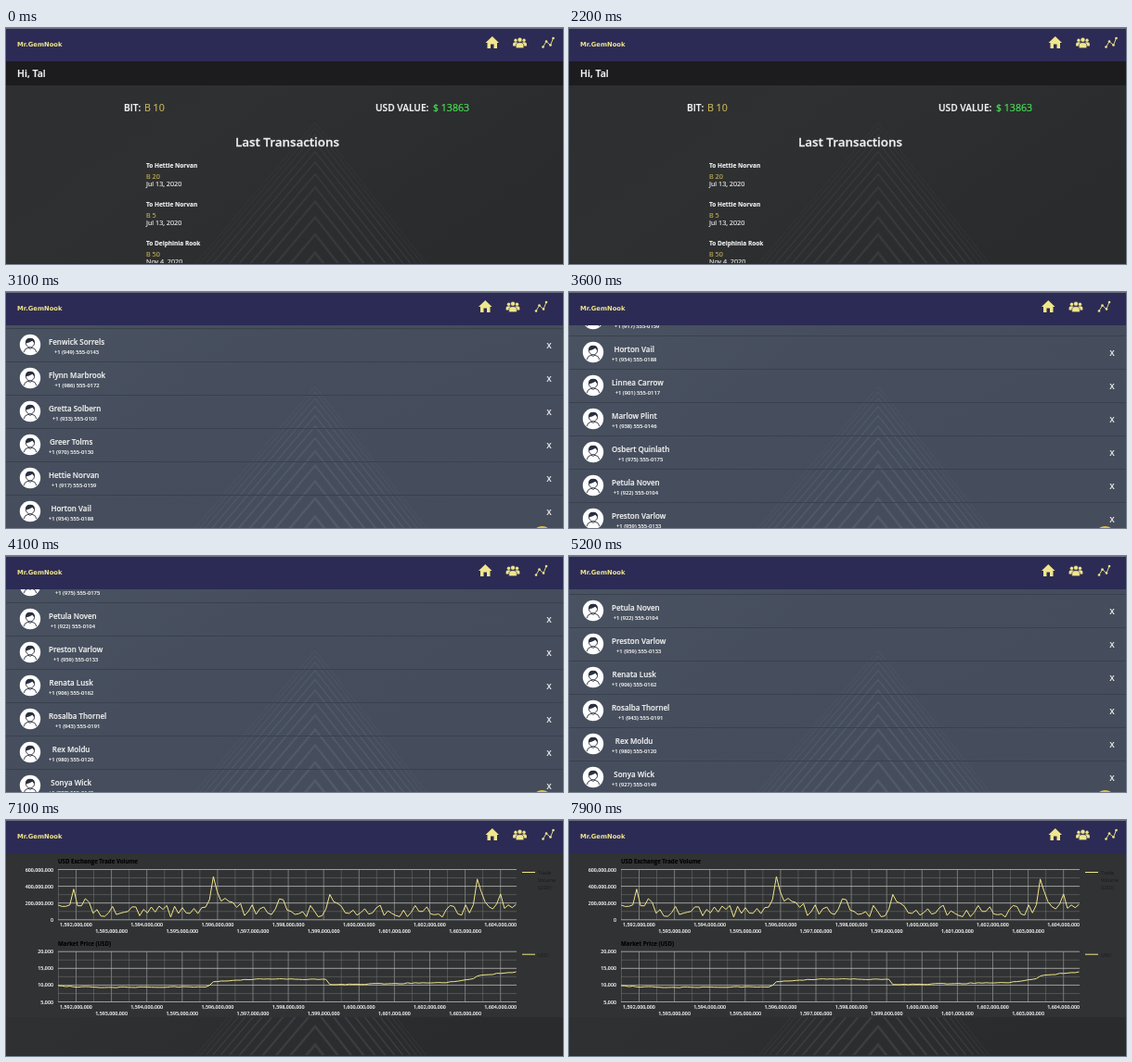
These frames come from a looping animation (600 px wide and 255 px high, 8 s). An HTML page:

```html
<!DOCTYPE html>
<html lang="en">
<head>
<meta charset="utf-8">
<title>Wallet</title>
<style>
  html, body { margin: 0; width: 100%; height: 100%; overflow: hidden; background: #2b2c2e; }
  svg { display: block; width: 600px; height: 255px; font-family: "Open Sans", "Noto Sans", sans-serif; }
  .mid { text-anchor: middle; }
  .end { text-anchor: end; }
</style>
</head>
<body>
<svg id="stage" viewBox="0 0 600 255"></svg>
<script>
const KHAKI = '#f0e68c', WHITE = '#f0f0f0', GOLD = '#c5b358';
const stage = document.getElementById('stage');

// A hairline outline gives the letters a medium weight
const text = (x, y, str, size, fill = WHITE, weight = 500, cls = '') =>
  `<text x="${x}" y="${y}" font-size="${size}" fill="${fill}" font-weight="${weight}" class="${cls}"
    stroke="${fill}" stroke-width="${size * 0.02}">${str}</text>`;
const rect = (x, y, w, h, fill) =>
  `<rect x="${x}" y="${y}" width="${w}" height="${h}" fill="${fill}"/>`;
const line = (x1, y1, x2, y2, stroke, width) =>
  `<path d="M${x1} ${y1}L${x2} ${y2}" stroke="${stroke}" stroke-width="${width}"/>`;
const polyline = points =>
  `<polyline points="${points.join(' ')}" fill="none" stroke="${KHAKI}" stroke-linejoin="round"/>`;
const footer = rect(0, 254, 600, 1, '#33243c');

// Nested chevrons that grow thicker and further apart downwards
function backdrop(fill, stroke) {
  let out = rect(0, 0, 600, 255, fill);
  for (let i = 0; i < 12; i++) {
    const y = 102 + 5.1 * i + 0.7 * i * i, h = 256 - y;
    out += `<path d="M${333 - h * 0.845} 256L333 ${y}L${333 + h * 0.785} 256" fill="none"
      stroke="${stroke}" stroke-width="${0.6 + i * 0.2}"/>`;
  }
  return out;
}

function dashboard() {
  const deals = [['Hettie Norvan', 20, 'Jul 13, 2020'], ['Hettie Norvan', 5, 'Jul 13, 2020'],
    ['Delphinia Rook', 50, 'Nov 4, 2020']];
  return backdrop('url(#dark)', '#37393d') +
    rect(0, 36, 600, 26, '#1c1c1f') +
    text(12, 52.5, 'Hi, Tal', 10.6, WHITE, 600) +
    text(127, 89.5, 'BIT:', 10.2, WHITE, 600) + text(149, 89.5, 'B 10', 10.6, GOLD) +
    text(398, 89.5, 'USD VALUE:', 10.2, WHITE, 600) + text(460, 89.5, '$ 13863', 10.6, '#45e052') +
    text(303, 127.5, 'Last Transactions', 13.4, WHITE, 600, 'mid') +
    deals.map(([who, sum, date], i) => {
      const y = 150.5 + 42 * i;
      return text(151, y, 'To ' + who, 6.5, WHITE, 700) +
        text(151, y + 12.5, 'B ' + sum, 7.2, GOLD) + text(151, y + 20.5, date, 7.2);
    }).join('') + footer;
}

const people = ['Delphinia Rook', 'Fenwick Sorrels', 'Flynn Marbrook', 'Gretta Solbern', 'Greer Tolms',
  'Hettie Norvan', 'Horton Vail', 'Linnea Carrow', 'Marlow Plint', 'Osbert Quinlath', 'Petula Noven',
  'Preston Varlow', 'Renata Lusk', 'Rosalba Thornel', 'Rex Moldu', 'Sonya Wick', 'Tilda Brace'];
const phone = i => `+1 (${900 + (i * 37 + 12) % 90}) 555-01${String((i * 29 + 14) % 100).padStart(2, '0')}`;

function contacts() {
  const rows = people.map((name, i) => `<g transform="translate(0 ${58 + 36 * i})">
    ${line(0, -17.5, 600, -17.5, '#39404e', 1)}
    <use href="#face" x="26"/>
    <g class="label">${text(46, -0.5, name, 8, WHITE, 600, 'mid')}${text(46, 9.5, phone(i), 5.8, WHITE, 600, 'mid')}</g>
    ${text(585, 3.5, 'X', 8, WHITE, 600, 'mid')}</g>`);
  return backdrop('url(#slate)', '#505a69') +
    `<g id="list">${rows.join('')}</g><circle cx="577.5" cy="264" r="11" fill="#dfc33f"/>`;
}

function errors() {
  return backdrop('url(#dark)', '#3b3d42') + [37, 47].map(y =>
    rect(0, y, 65, 8, '#c00') + text(0, y + 6, 'Table has no columns.', 5.7) +
    text(59, y + 6, '×', 6, '#400')).join('') + footer;
}

function chart(top, title, labels, curve, legend) {
  const step = 18.1, bottom = top + 3 * step;
  let out = text(56, top - 6.5, title, 6.1, '#000', 700) + line(56.5, top, 56.5, bottom, '#777', 0.5);
  for (let i = 0; i < 13; i++) {
    const x = 75.5 + 38.1 * i;
    out += line(x, top, x, bottom, '#aaa', 0.6) +
      text(x, bottom + 7.5 + i % 2 * 6.7, `1,${592 + i},000,000`, 5.35, WHITE, 600, 'mid');
    if (i < 12) out += line(x + 19, top, x + 19, bottom, '#777', 0.5);
  }
  labels.forEach((label, i) => {
    const y = top + step * i;
    out += line(56, y, 550, y, '#bbb', 0.8) + text(51, y + 2, label, 5.35, WHITE, 600, 'end');
    if (i < 3) out += line(56, y + step / 2, 550, y + step / 2, '#777', 0.5);
  });
  out += polyline(curve) + line(556, top + 3, 570, top + 3, KHAKI, 1);
  return out + legend.map((s, i) => text(573, top + 5.5 + 8 * i, s, 5.4, '#212122')).join('');
}

function randoms(seed) {
  return () => (seed = seed * 16807 % 2147483647) / 2147483647;
}
const curve = fn => Array.from({ length: 119 }, (_, i) => 56.2 + 4.18 * i).map(x => [x, fn(x)]);

// Trade volume: a restless base with sudden peaks that die away slowly
const peaks = [[73, 18], [86, 9], [224, 38], [244, 9], [295, 10], [349, 20], [508, 34], [531, 16]];
const volumeNoise = randoms(77);
const volume = curve(x => {
  const lift = peaks.reduce((sum, [px, h]) => sum + h * Math.exp(x < px ? (x - px) / 3 : (px - x) / 7), 0);
  return Math.min(105.5, 92 + 13 * volumeNoise() - lift);
});

// Price: straight stretches between a few turning points, slightly rough
const turns = [[56, 179.5], [105, 181], [218, 180], [224, 174.5], [262, 172], [345, 172], [349, 178],
  [475, 175.5], [503, 172], [508, 168], [551, 164]];
const priceNoise = randoms(9);
const price = curve(x => {
  const next = turns.findIndex(([tx]) => tx > x);
  const [x0, y0] = turns[next - 1], [x1, y1] = turns[next];
  return y0 + (y1 - y0) * (x - x0) / (x1 - x0) + priceNoise() - 0.5;
});

function charts() {
  return backdrop('url(#dark)', '#3b3d42') + rect(0, 36, 600, 177, '#313233') +
    chart(53.5, 'USD Exchange Trade Volume', ['600,000,000', '400,000,000', '200,000,000', '0'],
      volume, ['Trade', 'Volume', '(USD)']) +
    chart(142.2, 'Market Price (USD)', ['20,000', '15,000', '10,000', '5,000'], price, ['USD']) + footer;
}

const dots = [[578.5, 20.5], [582, 14.5], [586.5, 18.5], [589.5, 11]];
const person = (x, y, r) => `<circle cx="${x}" cy="${y}" r="${r}"/>
  <path d="M${x - r * 1.7} ${y + r * 3.6}v${-r}q0 ${-r * 1.4} ${r * 1.7} ${-r * 1.4}t${r * 1.7} ${r * 1.4}v${r}z"/>`;
const header = rect(0, 0, 600, 36, '#2c2b55') + rect(0, 0, 600, 1, '#6c6c80') +
  `<text x="12" y="20" font-size="6.8" font-weight="700" fill="${KHAKI}"
    font-family="DejaVu Sans, sans-serif">Mr.GemNook</text>
  <g id="icons" fill="${KHAKI}">
    <path d="M523.8 9L531 16H529V22H525.5V17.5H522V22H518.5V16H516.5Z"/>
    ${person(549, 13.3, 1.7)}${person(558, 13.3, 1.7)}
    <g stroke="#2c2b55" stroke-width=".6">${person(553.5, 12.7, 2.5)}</g>
    <polyline points="${dots.join(' ')}" fill="none" stroke="${KHAKI}" stroke-width=".9"/>
    ${dots.map(([x, y]) => `<circle cx="${x}" cy="${y}" r="1.3"/>`).join('')}
  </g>`;

const gradient = (id, a, b, c) => `<linearGradient id="${id}" x2="1" y2=".6"><stop stop-color="${a}"/>
  <stop offset=".45" stop-color="${b}"/><stop offset="1" stop-color="${c}"/></linearGradient>`;
const defs = `<defs>${gradient('dark', '#2d2e30', '#2f3031', '#2a2b2d')}
  ${gradient('slate', '#4a5361', '#464e5d', '#454c5b')}
  <g id="face"><circle r="11.2" fill="#fff"/>
    <g fill="none" stroke="#2b3040" stroke-width=".9">
      <circle cy="-1.8" r="4.6"/><path d="M-6.8 8Q-6 3.8 -2 3.2Q0 5.5 2 3.2Q6 3.8 6.8 8"/>
    </g>
    <path d="M-4.9 -1.5Q-5.6 -7.3 0 -7.3T4.9 -1.5Q3.5 -2.5 2.5 -4.3Q-1 -2 -4.9 -1.5Z" fill="#2b3040"/></g></defs>`;

const scenes = { dashboard, contacts, errors, charts };
stage.innerHTML = defs +
  Object.entries(scenes).map(([id, draw]) => `<g id="${id}">${draw()}</g>`).join('') + header;

// Name and phone share a centre; the wider of the two starts at x = 46
for (const label of document.querySelectorAll('.label')) {
  const lines = [...label.children];
  const width = Math.max(...lines.map(el => el.getComputedTextLength()));
  lines.forEach(el => el.setAttribute('x', 46 + width / 2));
}

function scrollAt(t) {
  const u = Math.min(1, Math.max(0, (t - 2800) / 1450));
  return 359 * (1 - Math.cos(Math.PI * u)) / 2;
}

const list = document.getElementById('list'), icons = document.getElementById('icons');
function frame() {
  const t = Math.floor(performance.now() % 8000 / 100) * 100;
  const current = t < 2300 ? 'dashboard' : t < 6200 ? 'contacts' : t < 6500 ? 'errors' : 'charts';
  for (const id in scenes)
    document.getElementById(id).style.visibility = id === current ? 'visible' : 'hidden';
  list.setAttribute('transform', `translate(0 ${-Math.round(scrollAt(t))})`);
  icons.setAttribute('transform', `translate(${current === 'contacts' ? -7.5 : 0} 0)`);
  requestAnimationFrame(frame);
}
frame();
</script>
</body>
</html>
```
